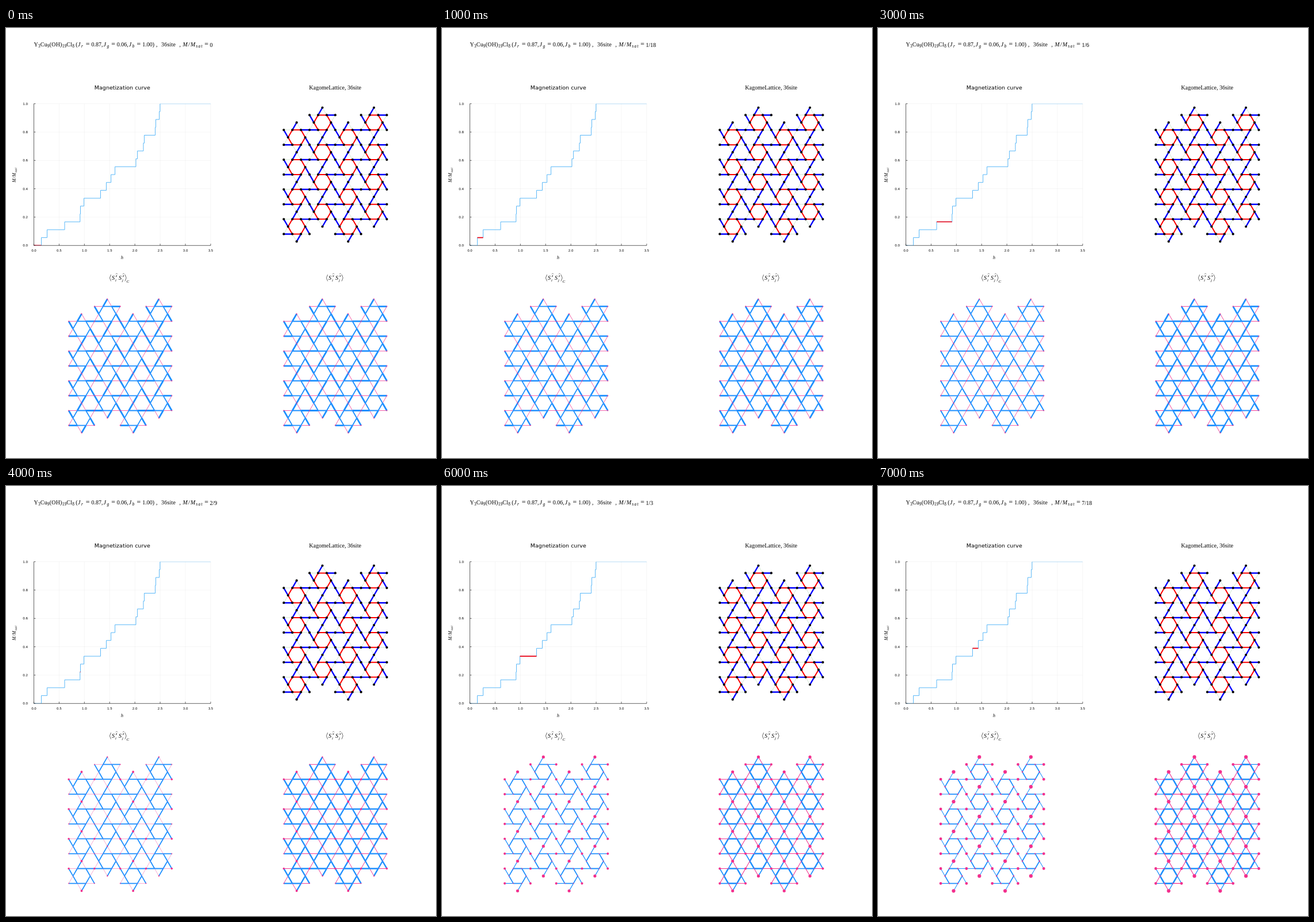
These frames come from a looping animation (748 by 748 pixels, 8 s). An HTML page:

```html
<!DOCTYPE html>
<html lang="en">
<head>
<meta charset="utf-8">
<title>Magnetization steps</title>
<style>
  html, body { margin: 0; width: 100%; height: 100%; overflow: hidden; background: #fff; }
  svg { display: block; }
  path { fill: none; }
  text { font-family: "Liberation Serif", serif; }
  .sans { font-family: "DejaVu Sans", sans-serif; }
  .it { font-style: italic; }
  .dots { stroke-linecap: round; }
</style>
</head>
<body>
<svg id="stage" width="748" height="748" viewBox="0 0 748 748"></svg>
<script>
const NS = "http://www.w3.org/2000/svg";
const stage = document.getElementById("stage");

function add(tag, attrs, parent = stage) {
  const el = document.createElementNS(NS, tag);
  for (const k in attrs) el.setAttribute(k, attrs[k]);
  return parent.appendChild(el);
}
const line = (d, stroke, width, more = {}) =>
  add("path", { d, stroke, "stroke-width": width, ...more });
function text(str, x, y, size, more = {}) {
  const el = add("text", { x, y, "font-size": size, ...more });
  el.textContent = str;
  return el;
}
// *x* is italic, _{x} is a subscript (italic when it is a word)
function rich(str, x, y, size, more = {}) {
  const el = add("text", { x, y, "font-size": size, ...more });
  let drop = 0;
  for (const [, sub, it, plain] of str.matchAll(/_\{(\w+)\}|\*([^*]+)\*|([^_*]+)/g)) {
    const want = sub ? size * 0.22 : 0;
    const span = add("tspan", { dy: want - drop, "font-size": sub ? size * 0.73 : size }, el);
    if (it || /^[a-z]/.test(sub || "")) span.setAttribute("class", "it");
    span.textContent = sub || it || plain;
    drop = want;
  }
  return el;
}
const middle = { "text-anchor": "middle" };

// ---- heading
const BASE = 31.5, EM = 10;
rich("Y_{3}Cu_{9}(OH)_{19}Cl_{8}", 48.5, BASE, EM, { "letter-spacing": 0.2 });
text("(", 121.3, BASE, EM);
["r0.87,", "g0.06,", "b1.00)"].forEach((s, i) => {
  const x = 125 + 44.4 * i;
  rich(`*J*_{${s[0]}}`, x, BASE, EM, { "letter-spacing": 1.6 });
  text("=", x + 13.8, BASE + 0.5, 12);
  text(s.slice(1), x + 23.4, BASE, EM);
});
text(",", 261, BASE, EM);
text("36site", 270, BASE, EM, { "letter-spacing": 0.2 });
text(",", 301.5, BASE, EM);
rich("*M/M*_{sat}", 307.5, BASE, EM, { "letter-spacing": 1.2 });
text("=", 345.3, BASE + 0.5, 12);
const fraction = text("0", 354.5, 33, EM);

// ---- magnetization curve
const LEFT = 48.5, RIGHT = 356, TOP = 131.7, BOTTOM = 378.3;
const X = h => LEFT + (RIGHT - LEFT) * h / 3.5;
const Y = m => BOTTOM - (BOTTOM - TOP) * m;
// fields at which the magnetization rises by 1/18
const fields = [0, 0.148, 0.262, 0.609, 0.914, 0.922, 0.991, 1.32, 1.434, 1.527,
  1.606, 2.02, 2.05, 2.168, 2.186, 2.403, 2.414, 2.483, 2.498, 3.5];

text("Magnetization curve", 202.3, 106.5, 9.5, { class: "sans", ...middle });
let grid = "", axes = `M${LEFT} ${TOP}V${BOTTOM}H${RIGHT}`;
for (let i = 0; i <= 7; i++) {
  const x = X(i / 2);
  grid += `M${x} ${TOP}V${BOTTOM}`;
  axes += `M${x} ${BOTTOM}v-3`;
  text((i / 2).toFixed(1), x, 389, 5.5, { class: "sans", ...middle });
}
for (let i = 0; i <= 5; i++) {
  const y = Y(i / 5);
  grid += `M${LEFT} ${y}H${RIGHT}`;
  axes += `M${LEFT} ${y}h3`;
  text((i / 5).toFixed(1), 38, y + 2, 5.5, { class: "sans", "text-anchor": "end" });
}
line(grid, "#000", 0.5, { opacity: 0.08 });
line(axes, "#000", 0.6);

add("rect", { x: LEFT, y: TOP, width: RIGHT - LEFT, height: BOTTOM - TOP },
  add("clipPath", { id: "plot" }));
const clip = { "clip-path": "url(#plot)" };
const step = k => `${Y(k / 18)}H${X(fields[k + 1])}`;
let curve = `M${LEFT} ${BOTTOM}`;
for (let k = 0; k <= 18; k++) curve += "V" + step(k);
line(curve, "#48b0f8", 0.9, clip);
const plateau = line("", "#f00012", 1.6, clip);

text("h", 202, 401.5, 8, { class: "it", ...middle });
rich("*M/M*_{sat}", 0, 0, 7.6,
  { transform: "translate(17 268.5) rotate(-90)", "letter-spacing": 0.8 });

// ---- lattice made of sixteen six-pointed stars in four staggered columns
const SIDE = 14.94, ROW = SIDE * Math.sqrt(3) / 2;
const BLUE = "#1e90ff", PINK = "#f2308e";

function lattice(left, top) {
  const d = { weak: "", ring: "", strong: "", tipEven: "", tipOdd: "", sideA: "", sideB: "", hex: "" };
  for (let n = 0; n < 16; n++) {
    const col = n % 4, odd = col % 2;
    const cx = left + col * 3 * SIDE;
    const cy = top + ((odd ? 2 : 4) + 4 * Math.floor(n / 4)) * ROW;
    const at = (r, deg) => {
      const a = deg * Math.PI / 180;
      return `${(cx + r * Math.cos(a)).toFixed(2)} ${(cy - r * Math.sin(a)).toFixed(2)}`;
    };
    for (let k = 0; k < 6; k++) {
      const v = at(SIDE, 60 * k), w = at(SIDE, 60 * k + 60), tip = at(2 * ROW, 60 * k + 30);
      const vertical = k % 3 === 1, upper = k < 3;
      d.ring += `M${v}L${w}`;
      d.strong += `M${tip}L${w}`;
      d.weak += `M${tip}L${v}`;
      d.hex += `M${v}h0`;
      d[vertical ? (odd ? "tipOdd" : "tipEven") : upper !== !!odd ? "sideA" : "sideB"] += `M${tip}h0`;
    }
  }
  return d;
}

const DOTS = ["tipEven", "tipOdd", "sideA", "sideB", "hex"];

text("KagomeLattice, 36site", 572.6, 107, 10, middle);
const model = lattice(505.6, 138.5);
line(model.weak, "#008000", 0.18);
line(model.ring, "#f00", 2);
line(model.strong, "#00f", 2.4);
line(DOTS.map(k => model[k]).join(""), "#000", 4.2, { class: "dots" });

function panel(left) {
  const d = lattice(left, 471.4);
  return {
    bonds: [line(d.weak, PINK, 0), line(d.ring, BLUE, 0), line(d.strong, BLUE, 0)],
    dots: DOTS.map(k => line(d[k], PINK, 0, { class: "dots" }))
  };
}
const panels = [panel(131.5), panel(505.6)];

function bracket(x, axis) {
  line(`M${x + 2.6} 429l-2.2 5.7l2.2 5.7M${x + 27} 429l2.2 5.7l-2.2 5.7`, "#000", 0.6);
  ["i", "j"].forEach((site, i) => {
    const sx = x + 4 + 12 * i;
    text("S", sx, 438, 10, { class: "it" });
    text(axis, sx + 6.8, 433.2, 6.8, { class: "it" });
    text(site, sx + 6, 441, 6.8, { class: "it" });
    line(`M${sx + 7} 428.3l1.5 -1.6l1.5 1.6`, "#000", 0.5);
  });
}
bracket(180, "z");
text("C", 209.5, 443, 7, { class: "it" });
bracket(557, "x");

// ---- one plateau per second, magnetization i/18
const gcd = (a, b) => b ? gcd(b, a % b) : a;
const setWidths = (els, widths) =>
  els.forEach((el, k) => el.setAttribute("stroke-width", widths[k]));

function show(i) {
  const g = gcd(i, 18);
  fraction.textContent = i ? `${i / g}/${18 / g}` : "0";
  plateau.setAttribute("d", `M${X(fields[i])} ${step(i)}`);

  // order grows above 1/6; the 2/9 state is striped
  const order = Math.max(0, (i - 3) / 4);
  const stripe = i === 4 ? 0.4 : 0;
  const tip = 1 + 2.1 * order, side = 1 + 1.4 * order;
  const radii = [tip + stripe, tip - stripe, side + stripe, side - stripe, 1.2 * order];

  setWidths(panels[0].bonds, [0.75 * (1 - order) ** 2, 1.8, 2.8 - 0.25 * i]);
  setWidths(panels[1].bonds, [0.8 + 0.04 * i, 1.9 + 0.1 * i, 2.8 - 1.5 * order]);
  for (const p of panels) setWidths(p.dots, radii.map(r => 2 * r));
}

let shown = -1;
function tick() {
  const i = Math.floor(performance.now() / 1000) % 8;
  if (i !== shown) show(shown = i);
  requestAnimationFrame(tick);
}
tick();
</script>
</body>
</html>
```
